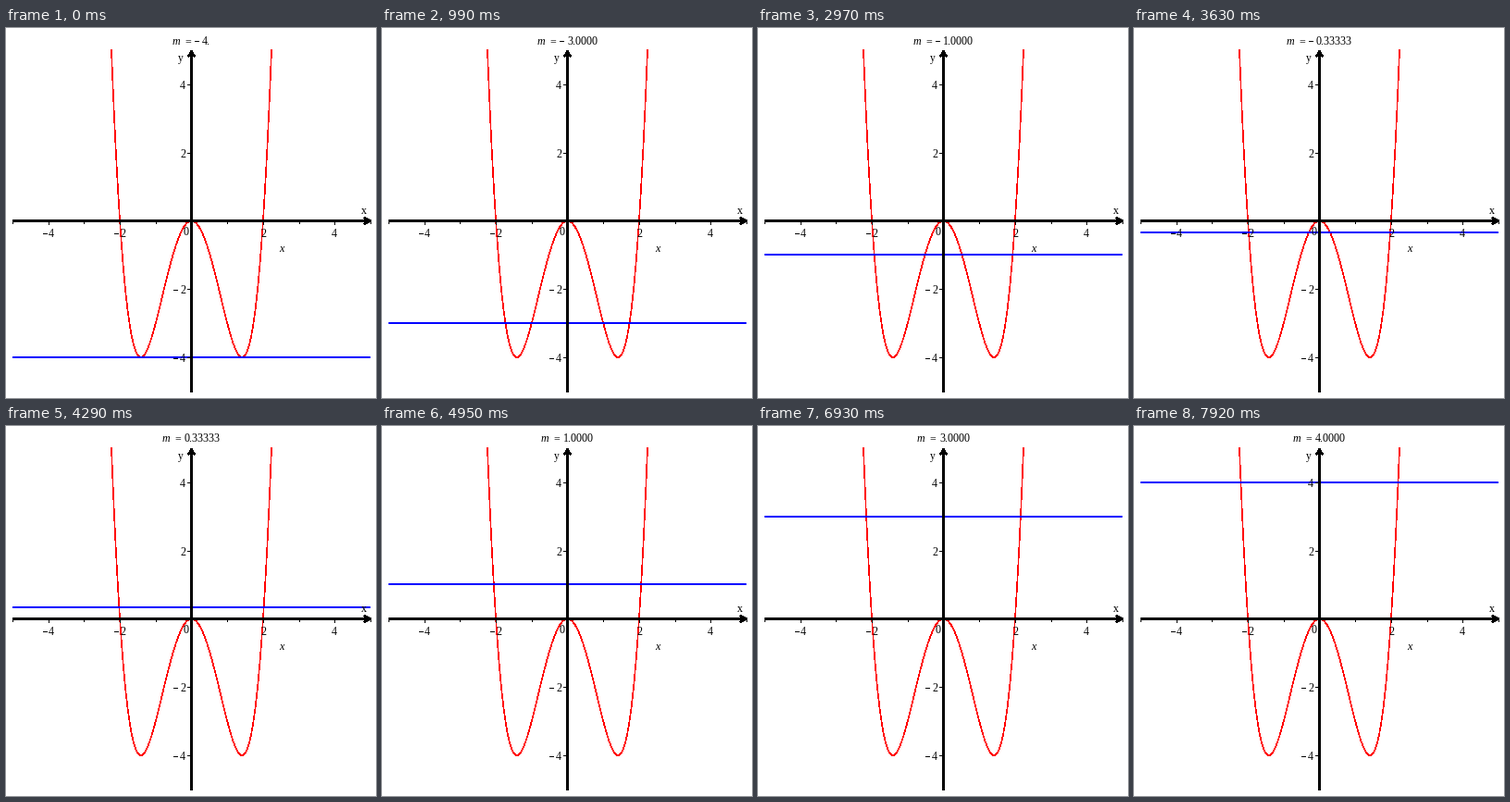
A matplotlib script that plays this animation: 400 by 400 pixels, repeating every 8.25 s.

```python
import math
import numpy as np
import matplotlib.pyplot as plt
from matplotlib.animation import FuncAnimation
from matplotlib.patches import Rectangle

STAGE, DPI = 400, 100
PX = 72 / DPI
FRAMES, STEP = 25, 330
X0, Y0 = 200.5, 208.4
SX, SY = 38.7, 36.91

plt.rcParams.update({
    "font.family": "Liberation Serif",
    "text.hinting": "native",
})

fig = plt.figure(figsize=(STAGE / DPI, STAGE / DPI), dpi=DPI, facecolor="white")
ax = fig.add_axes([0, 0, 1, 1])
ax.set(xlim=(0, STAGE), ylim=(STAGE, 0))
ax.axis("off")


def box(x, y, w, h, color="black", z=4):
    return ax.add_patch(Rectangle((x, y), w, h, facecolor=color, lw=0,
                                  antialiased=False, zorder=z))


def label(x, y, s, style="normal"):
    return ax.text(x, y, s, fontsize=12 * PX, style=style,
                   ha="left", va="baseline", zorder=5)


def dash(x, base):
    return box(x, base - 4, 5, 1, z=5)


def stroke(x, y, color, width, z):
    ax.plot(x, y, color=color, lw=width * PX, antialiased=False,
            solid_joinstyle="miter", solid_capstyle="butt", zorder=z)


# Quartic curve
x = np.linspace(-5 ** 0.5, 5 ** 0.5, 121)
stroke(X0 + SX * x, Y0 - SY * (x ** 4 - 4 * x ** 2), "red", 0.6, 1)

# Axes with open arrowheads
box(7, 207, 387, 3)
box(199, 25, 3, 369)
stroke([387, 394, 387], [205, 208.5, 212], "black", 1, 4)
stroke([197, 200.5, 204], [31, 24.5, 31], "black", 1, 4)

# Ticks and numbers
for i in range(-5, 6):
    box(math.ceil(X0 + SX * i - 0.5), 210, 1, 3 if i % 2 == 0 else 2)
for v in (-4, -2, 2, 4):
    tx, ty = round(X0 + SX * v), round(Y0 - SY * v)
    box(196, ty, 3, 1)
    label(tx if v < 0 else tx - 3, 226, str(abs(v)))
    label(188, ty + 5, str(abs(v)))
    if v < 0:
        dash(tx - 6, 226)
        dash(181, ty + 5)

label(192, 224, "0")
label(186, 36, "y")
label(384, 201, "x")
label(295, 242, "x", "italic")

# Moving level and its caption
level = box(7, 355, 387, 2, "blue", 2)
name = label(0, 18, "m", "italic")
equals = label(0, 18, "=")
minus = dash(0, 18)
value = label(0, 18, "")


def caption(m):
    if m in (-4, 0):
        return f"{abs(m):.0f}."
    return f"{abs(m):.5f}" if abs(m) < 1 else f"{abs(m):.4f}"


def update(k):
    m = (k - 12) / 3
    level.set_y(round(209.33 - SY * m) - 2)

    text = caption(m)
    sign = 8 if m < 0 else 0
    width = 24 + sign + 6 * (len(text) - 1) + 3
    left = round(X0 - width / 2)
    base = 18 if m < 0 else 17
    name.set_position((left, base))
    equals.set_position((left + 13, base))
    minus.set_xy((left + 24, base - 4))
    minus.set_visible(m < 0)
    value.set_position((left + 24 + sign, base))
    value.set_text(text)
    return level, name, equals, minus, value


anim = FuncAnimation(fig, update, frames=FRAMES, interval=STEP,
                     repeat=True, repeat_delay=0, blit=False)
plt.show()
```
